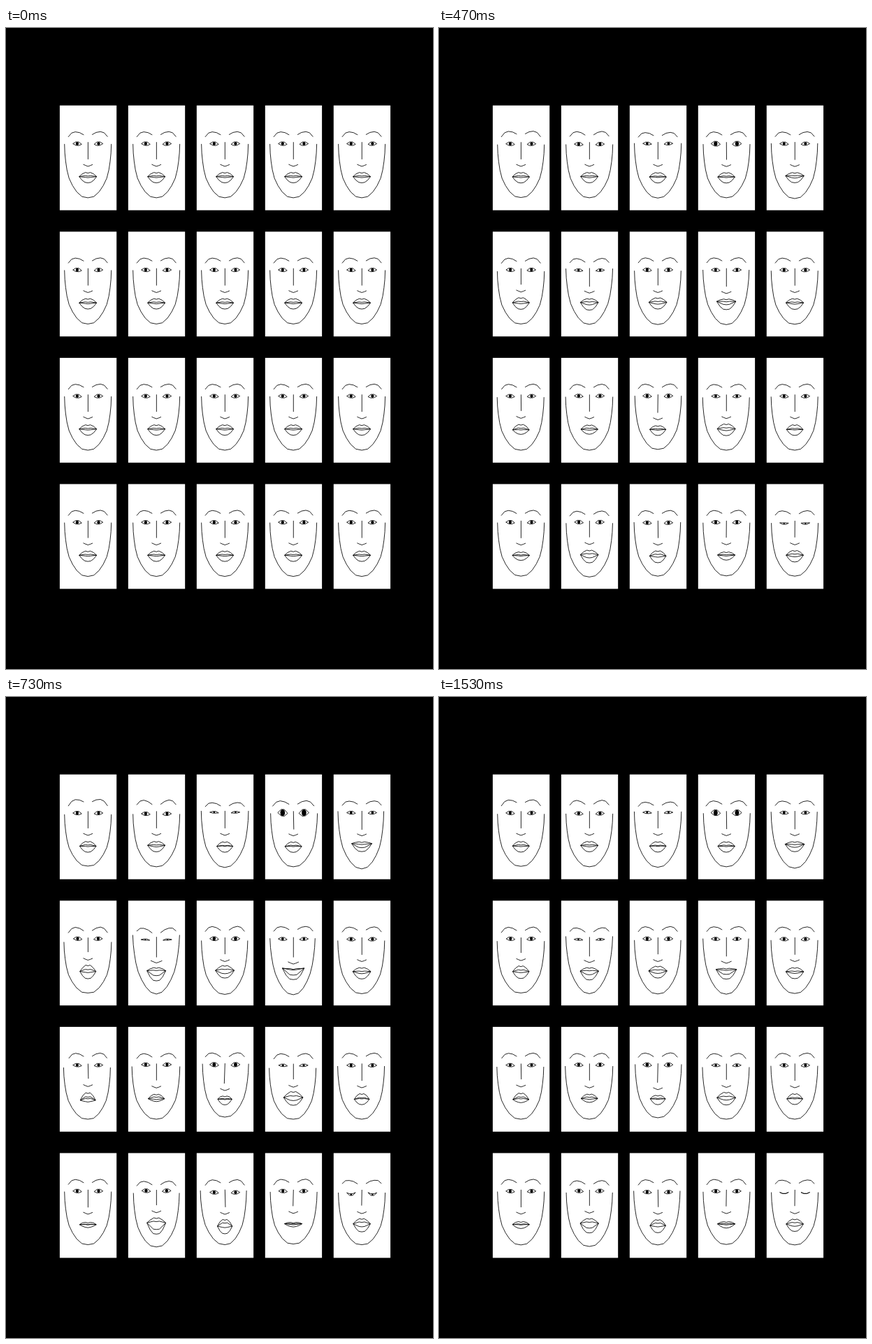
An HTML page that plays this animation: 611x917 px, repeating every 1590 ms.

```html
<!DOCTYPE html>
<html lang="en">
<head>
<meta charset="utf-8">
<title>Twenty faces</title>
<style>
  html, body { margin: 0; width: 100%; height: 100%; overflow: hidden; background: #000; }
  svg { display: block; width: 100%; height: 100%; }
  .line { fill: none; stroke: #000; stroke-width: 0.85; stroke-linejoin: round; }
</style>
</head>
<body>
<svg id="stage" viewBox="0 0 611 917"></svg>
<script>
const LOOP = 1590;
// [start in ms, strength of the expression]
const STEPS = [[0, 0], [330, 0.01], [400, 0.11], [470, 0.38], [530, 0.74], [600, 0.96],
  [670, 0.99], [730, 1], [1400, 0.99], [1470, 0.91], [1530, 0.68]];

// Offsets in px from the neutral face; eye is the change in lid opening.
// brow: whole, browIn/browOut: ends, browX/eyeX: away from the middle;
// jaw/chin: vertical, jawX/jawW/taper: sideways;
// nose: bridge end, base/flare: nostrils, tilt: bridge end sideways;
// corner, wide, top, bottom, inTop, inBottom: mouth.
const FACES = [
  { brow: -1.8, browIn: -1, browOut: 2, eyeY: 0.5, jaw: 2, chin: -1, corner: 0.8, wide: -0.7, bottom: 0.6 },
  { brow: -1, browIn: 2, browOut: -0.5, eyeY: 1.5, jaw: 1.5, corner: -0.4, inBottom: 0.4 },
  { brow: 2.7, browIn: 0.3, browOut: -1.5, eye: -0.5, eyeY: -0.6, jaw: -3, chin: 1, jawW: 0.3, corner: 1, wide: -1, top: 0.6, bottom: 0.6, inTop: 1, inBottom: -0.6 },
  { browIn: 0.7, browOut: 0.5, browX: 1.6, eye: 0.9, jaw: 0.5, jawX: 1, nose: 1.6, base: 0.7, tilt: 0.5, corner: 1.2, wide: -0.5, top: 0.7, bottom: 0.8, inTop: 0.7 },
  { brow: 0.4, browOut: -1, eye: -0.15, jaw: -2.5, chin: 3, jawX: -1.3, jawW: -0.7, nose: 2, base: 0.7, corner: -3, wide: 2, top: 0.6, bottom: -0.3, inTop: -0.8, inBottom: 1.5 },

  { brow: 0.3, browIn: 0.8, browOut: 0.8, eyeX: -0.6, eyeY: -0.3, jaw: 4, jawX: -0.3, jawW: 0.5, nose: -3.5, base: -2, corner: -0.6, wide: -1, top: -3.6, bottom: 1, inTop: -2.3, inBottom: -0.3 },
  { brow: 1.8, browIn: 2.4, browOut: -3.2, eye: -0.65, eyeX: 0.6, eyeY: 1, jaw: -6, chin: 1.5, jawX: -0.3, taper: 1.2, nose: 4, base: 2, flare: 1.5, corner: -1.6, wide: 1, bottom: 4, inTop: -1, inBottom: 4 },
  { brow: -0.8, browIn: 1.2, eyeY: -0.3, eye: 0.1, jaw: 2, chin: 2, jawX: -0.4, jawW: -0.4, nose: -0.5, corner: -2, wide: 1, top: -3, inTop: -2.6, inBottom: 1.2 },
  { brow: -0.6, browOut: -0.5, eye: -0.12, jaw: -1.3, chin: 2.5, jawX: -1.1, jawW: -1.2, taper: 1, nose: 4, base: 3.6, flare: 1, corner: -5.2, wide: 3.2, top: 1.5, bottom: 2.2, inTop: -1.8, inBottom: 3.2 },
  { browIn: 0.2, eyeY: 0.4, jaw: 2, chin: 1, jawX: -0.8, nose: 0.4, corner: -0.4, wide: 0.4, bottom: 1.3, inTop: 0.2, inBottom: 1.2 },

  { browIn: 0.3, browX: -0.8, eye: -0.08, jaw: 3, jawX: -1.3, nose: -3, base: -1.7, tilt: 0.5, corner: 3.2, wide: -1.5, top: -1.5, bottom: -3.2, inTop: -0.6, inBottom: -0.4 },
  { brow: 0.4, browIn: 0.8, eyeY: -0.7, jaw: 1.5, jawW: 0.8, jawX: -0.7, nose: -0.5, base: 0.3, corner: 1, wide: -0.8, top: 0.6, bottom: -3.8, inTop: -0.4, inBottom: 0.6 },
  { brow: -0.5, browIn: 1.4, browOut: -1.4, eye: 0.2, eyeY: -0.7, jaw: -2.3, jawX: 1, jawW: -0.5, chin: -3, nose: 4, base: 4, tilt: -1, corner: 1.6, wide: -2.3, top: 3.2, bottom: 0.9, inTop: 2, inBottom: 0.8 },
  { brow: 0.6, browOut: 0.4, eye: -0.3, eyeX: -0.4, eyeY: 0.3, jaw: 3.7, jawX: -1, nose: -2, base: -0.8, corner: -0.8, wide: 1.4, top: -3.2, bottom: 1.5, inTop: -2, inBottom: 2.2 },
  { browIn: 0.3, browOut: -0.4, eye: -0.05, eyeY: 0.3, jaw: 1, jawX: -1, wide: -1.7, corner: 1.8, top: -0.2, bottom: 0.6, inTop: 0.6, inBottom: -0.2 },

  { browIn: 0.4, eyeY: -0.4, nose: 0.7, base: 0.3, chin: -1, corner: 0.5, wide: -0.5, top: 3.3, bottom: -4, inTop: 1.2, inBottom: -0.6 },
  { brow: 2.6, browIn: 0.8, browOut: -0.6, eyeX: -0.6, eyeY: -0.8, eye: 0.05, jaw: 2, chin: 2.2, jawW: -0.6, nose: -2.5, base: -1.8, corner: -2, wide: 1, top: -3.2, bottom: 5.2, inTop: -3, inBottom: 6 },
  { brow: 0.5, browOut: 0.7, eyeY: 1.5, jaw: -1.5, jawX: -2, jawW: -0.5, chin: -1, nose: 0.3, base: 0.5, tilt: 0.6, corner: 2.8, wide: -1.8, top: -0.8, bottom: 4.8, inTop: -0.8, inBottom: 3.4 },
  { brow: -0.2, browOut: 0.8, eyeX: -0.4, eyeY: -0.4, jaw: 0.4, jawX: 0.5, chin: -2, nose: -1.2, base: -0.8, tilt: -0.6, corner: -0.7, wide: 0.1, top: 3.4, bottom: -5, inTop: 0.2, inBottom: -0.7 },
  { brow: 1.4, browIn: 0.6, browOut: -2.6, eye: -1.5, eyeY: 2.1, droop: 2.6, jaw: 1.5, chin: -1, nose: -2, base: -0.5, tilt: -0.4, corner: -0.6, wide: -0.2, top: -2, bottom: 2, inTop: -2, inBottom: 2.2 }
];

const JAW = [[33.5, 55], [33, 68], [31.8, 80], [30, 92], [27, 104], [22, 114.5], [16, 123.5], [8.5, 130.3], [0, 132]];
const BROW = [[28.2, 45], [23.3, 39.3], [18, 37.7], [11.8, 38.8], [5.9, 42]];
const NS = "http://www.w3.org/2000/svg";
const stage = document.getElementById("stage");

function add(tag, attrs, parent) {
  const el = document.createElementNS(NS, tag);
  for (const key in attrs) el.setAttribute(key, attrs[key]);
  return parent.appendChild(el);
}

const line = points => "M" + points.map(p => p[0].toFixed(2) + " " + p[1].toFixed(2)).join("L");
const mirrored = half => [
  ...half.map(([x, y]) => [-x, y]),
  ...half.slice(0, -1).reverse()
];

function jawLine(v) {
  const right = JAW.map(([x, y], i) => {
    const t = i / 8;
    return [x + (v("jawW") - v("taper") * t * 2) * Math.min(1, 2 - 2 * t),
      y + v("jaw") * (1 - t) + v("chin") * t, t];
  });
  const place = side => right.map(([x, y, t]) => [side * x + v("jawX") * (1 - t * t), y]);
  return line([...place(-1), ...place(1).reverse().slice(1)]);
}

function browLine(v, side) {
  return line(BROW.map(([x, y], i) => {
    const outer = Math.max(0, 1 - i / 2), inner = Math.max(0, i / 2 - 1);
    const lift = side > 0 ? -0.3 : 0;
    return [side * (x + v("browX") * (1 - i / 4)),
      y + lift + v("brow") + v("browOut") * outer + v("browIn") * inner];
  }));
}

function eyeShape(v, side) {
  const open = 1 + v("eye"), y = 54.6 + v("eyeY"), mid = y + v("droop");
  const grow = Math.max(0, open - 1) * 0.9;
  const at = (x, py) => [side * (x + v("eyeX")), py];
  return {
    d: line([at(21.5 + grow, y), at(17.4, mid - 2.5 * open), at(13, mid - 2.4 * open),
      at(8.9 - grow, y + 0.9 - v("droop") * 0.5), at(12.9, mid + 2.6 * open), at(17.2, mid + 2.4 * open)]) + "Z",
    cx: side * (15.3 + v("eyeX")), cy: mid, rx: 2.1 * Math.abs(open) ** 0.7, ry: 2.4 * Math.abs(open)
  };
}

function noseLines(v) {
  const b = v("base"), f = v("flare");
  return line([[0.2, 52.3 + v("jaw") * 0.1], [0.2 + v("tilt"), 77 + v("nose")]]) +
    line([[-6.7 - f, 84.2 + b - f * 0.4], [-3.4, 85.7 + b], [0, 87 + b],
      [3.4, 85.9 + b], [6.8 + f, 84.4 + b - f * 0.4]]);
}

function mouthLines(v) {
  const c = v("corner"), w = v("wide"), t = v("top"), b = v("bottom");
  const corner = [12.5 + w, 101.7 + c];
  const upper = [corner, [8.2 + w * 0.65, 97.9 + c * 0.3 + t * 0.5], [3.4 + w * 0.2, 95.7 + t], [0, 96.7 + t]];
  const lower = [corner, [8.3 + w * 0.65, 106.9 + c * 0.35 + b * 0.65], [4.2 + w * 0.3, 109.9 + b], [0, 110.6 + b]];
  const inUp = [corner, [4 + w * 0.3, 100.4 + v("inTop")], [0, 101 + v("inTop")]];
  const inLow = [corner, [4 + w * 0.3, 102.7 + v("inBottom")], [0, 103.2 + v("inBottom")]];
  return [upper, lower, inUp, inLow].map(half => line(mirrored(half))).join("");
}

const faces = FACES.map((mood, i) => {
  const x = 76.9 + (i % 5) * 97.97, y = 110.8 + Math.floor(i / 5) * 180.55;
  add("rect", { x, y, width: 81.3, height: 149.9, fill: "#fff" }, stage);
  const group = add("g", { transform: `translate(${x + 40.3} ${y + 0.1})` }, stage);
  const path = add("path", { class: "line" }, group);
  const pupils = [-1, 1].map(() => add("ellipse", {}, group));
  return { mood, path, pupils };
});

function pose({ mood, path, pupils }, strength) {
  const v = key => (mood[key] || 0) * strength;
  const eyes = [-1, 1].map(side => eyeShape(v, side));
  path.setAttribute("d", jawLine(v) + browLine(v, -1) + browLine(v, 1) +
    noseLines(v) + mouthLines(v) + eyes.map(eye => eye.d).join(""));
  pupils.forEach((pupil, i) => {
    for (const key of ["cx", "cy", "rx", "ry"]) pupil.setAttribute(key, eyes[i][key]);
  });
}

function draw(now) {
  const t = now % LOOP;
  const strength = STEPS.filter(step => step[0] <= t).pop()[1];
  faces.forEach(face => pose(face, strength));
}

const start = performance.now();
function tick() {
  draw(performance.now() - start);
  requestAnimationFrame(tick);
}
tick();
</script>
</body>
</html>
```
